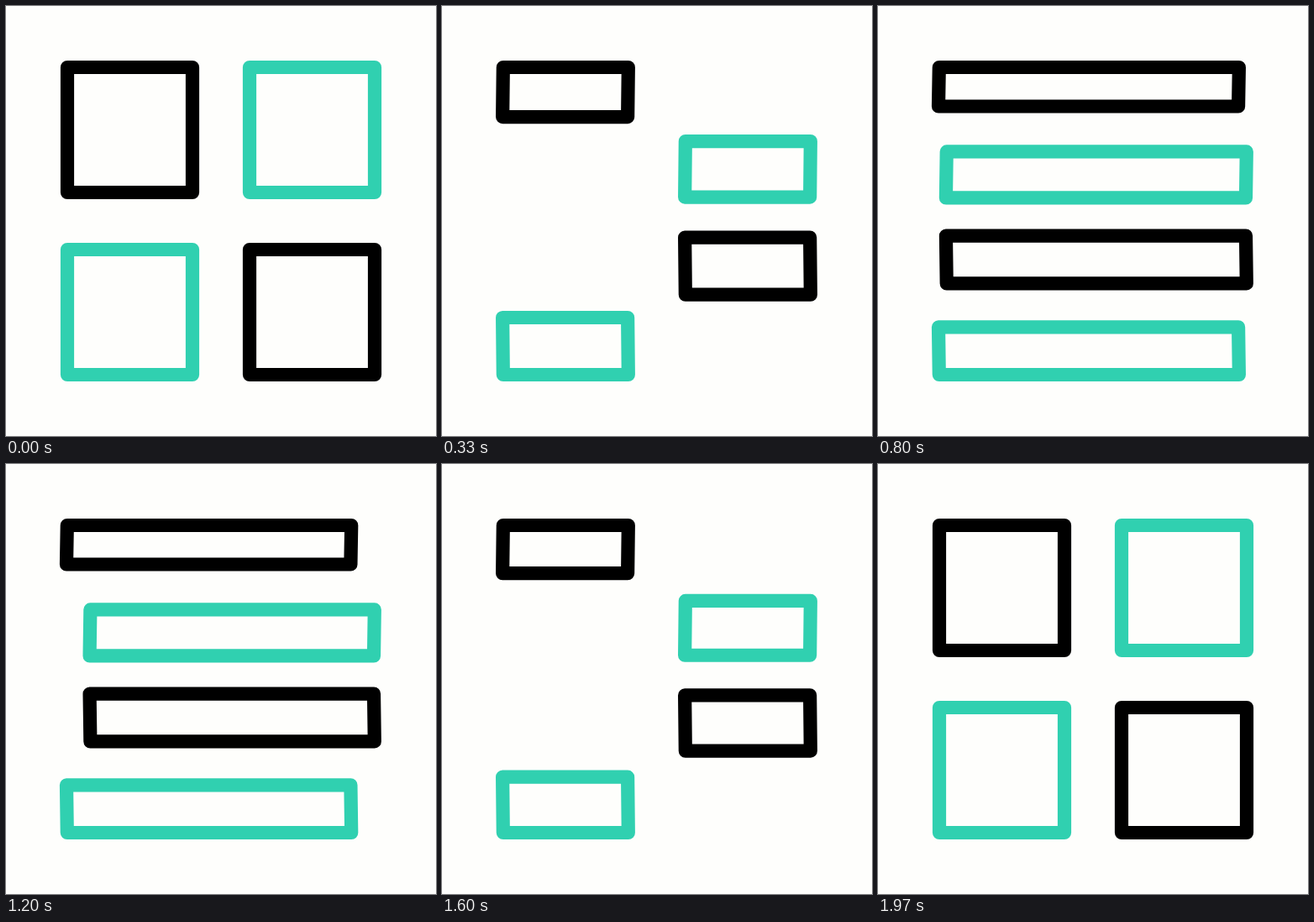
An HTML page for the animation above (2.01 s loop, 512 px wide and 512 px high).

```html
<!DOCTYPE html>
<html>
<head>
<meta charset="utf-8">
<style>
html, body { margin: 0; width: 100%; height: 100%; overflow: hidden; background: #fefefc; }
svg { display: block; width: 100%; height: 100%; }
polygon { fill: none; stroke: #30d0b0; stroke-width: 16.2; stroke-linejoin: round; }
.dark { stroke: #000; }
</style>
</head>
<body>
<svg viewBox="0 0 512 512"></svg>
<script>
const LOOP = 2010, FRAME = 100 / 3, LAST = 59;
const EDGE = 73, SIDE = 149, PITCH = 217;
const SHIFT = -0.6, LEAN = 0.4; // slight slant of the flat bars

// top and bottom: where the square ends up once flattened
const boxes = [
  { col: 0, row: 0, top: 73, bottom: 119.5 },
  { col: 1, row: 0, top: 173.4, bottom: 228.4 },
  { col: 1, row: 1, top: 273.6, bottom: 330.4 },
  { col: 0, row: 1, top: 382.3, bottom: 439 }
];

const svg = document.querySelector('svg');
for (const box of boxes) {
  box.node = document.createElementNS(svg.namespaceURI, 'polygon');
  if (box.col === box.row) box.node.classList.add('dark');
  svg.append(box.node);
}

function ease(frame, from, to) {
  const u = Math.min(1, Math.max(0, (frame - from) / (to - from)));
  return u * u * (3 - 2 * u);
}

const mix = (a, b, k) => a + (b - a) * k;

function outline({ col, row, top, bottom }, squash, widen) {
  const x = EDGE + PITCH * col, y = EDGE + PITCH * row;
  // Each bar slides out towards the other column.
  const left = x - PITCH * widen * col;
  const right = x + SIDE + PITCH * widen * (1 - col);
  const lean = squash * LEAN * (row ? 1 : -1);
  const upper = mix(y, top, squash), lower = mix(y + SIDE, bottom, squash);
  const dx = squash * SHIFT;
  return [
    [left + dx - lean, upper], [right + dx - lean, upper],
    [right + dx + lean, lower], [left + dx + lean, lower]
  ];
}

function draw(time) {
  // 30 steps per second
  const frame = Math.min(LAST, Math.floor((time % LOOP + 4) / FRAME));
  const squash = ease(frame, 0, 12.8) - ease(frame, 45.4, 58.4);
  const widen = ease(frame, 12.5, 25.6) - ease(frame, 33.1, 46.1);
  for (const box of boxes) {
    box.node.setAttribute('points', outline(box, squash, widen).join(' '));
  }
}

const start = performance.now();
function tick() {
  draw(performance.now() - start);
  requestAnimationFrame(tick);
}
tick();
</script>
</body>
</html>
```
